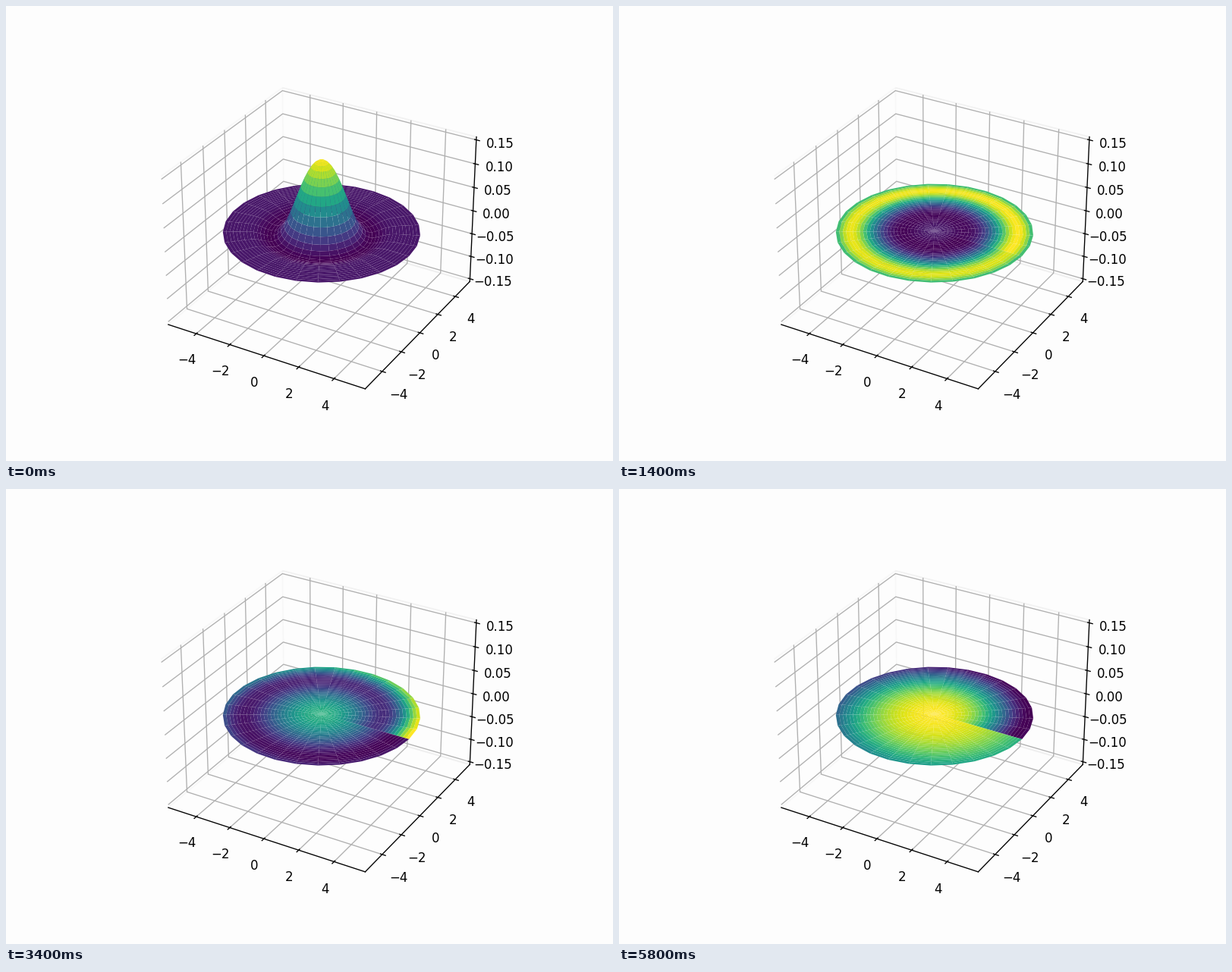
Animation of 800x600 px, one loop 6000 ms. Source, as a matplotlib script:

```python
import matplotlib.pyplot as plt
import numpy as np
from matplotlib.animation import FuncAnimation

FRAMES, STEP_MS = 30, 200
RADIUS, HEIGHT = 5, 0.148
Z_LIMIT = 0.15 * (1 + 1 / 24)
BACKGROUND = "#fdfdfd"

plt.rcParams.update({"font.family": "DejaVu Sans", "font.size": 10})

rho, theta = np.meshgrid(np.linspace(0, 1, 30), np.linspace(0, 2 * np.pi, 30))
x = RADIUS * rho * np.cos(theta)
y = RADIUS * rho * np.sin(theta)
u = rho ** 2
ahead = 1 - theta / (2 * np.pi)


def wave(t):
    """Spreading packet whose phase winds with radius, later also with angle."""
    lag = 2.08 * t ** 0.3
    skew = 0.14 * max(0, t - 9.5) * ahead ** 1.5
    sweep = 9 * np.exp(-t / 12) * (1 + skew)
    fade = np.exp(-2 * u / (t + 0.22))
    lift = 0.55 * np.exp(-((t - 13) / 5) ** 2) * ahead * 4 * u * (1 - u)
    return fade * np.cos(sweep * u - lag) + lift


def cell_means(v):
    return (v[:-1, :-1] + v[1:, :-1] + v[:-1, 1:] + v[1:, 1:]).ravel() / 4


fig = plt.figure(figsize=(800 / 120, 600 / 120), dpi=120, facecolor=BACKGROUND)
ax = fig.add_subplot(projection="3d", facecolor=BACKGROUND)
for axis in (ax.xaxis, ax.yaxis, ax.zaxis):
    axis.pane.fill = False
surface = None


def draw(t):
    global surface
    if surface is not None:
        surface.remove()
    level = wave(t)
    z = HEIGHT * (1 + t) ** -3.5 * level
    surface = ax.plot_surface(x, y, z, cmap="viridis")
    surface.set_array(cell_means(level))
    surface.autoscale()
    ax.set_zlim(-Z_LIMIT, Z_LIMIT)
    return [surface]


anim = FuncAnimation(fig, draw, frames=FRAMES, interval=STEP_MS,
                     init_func=lambda: [], repeat=True, repeat_delay=0)
plt.show()
```
